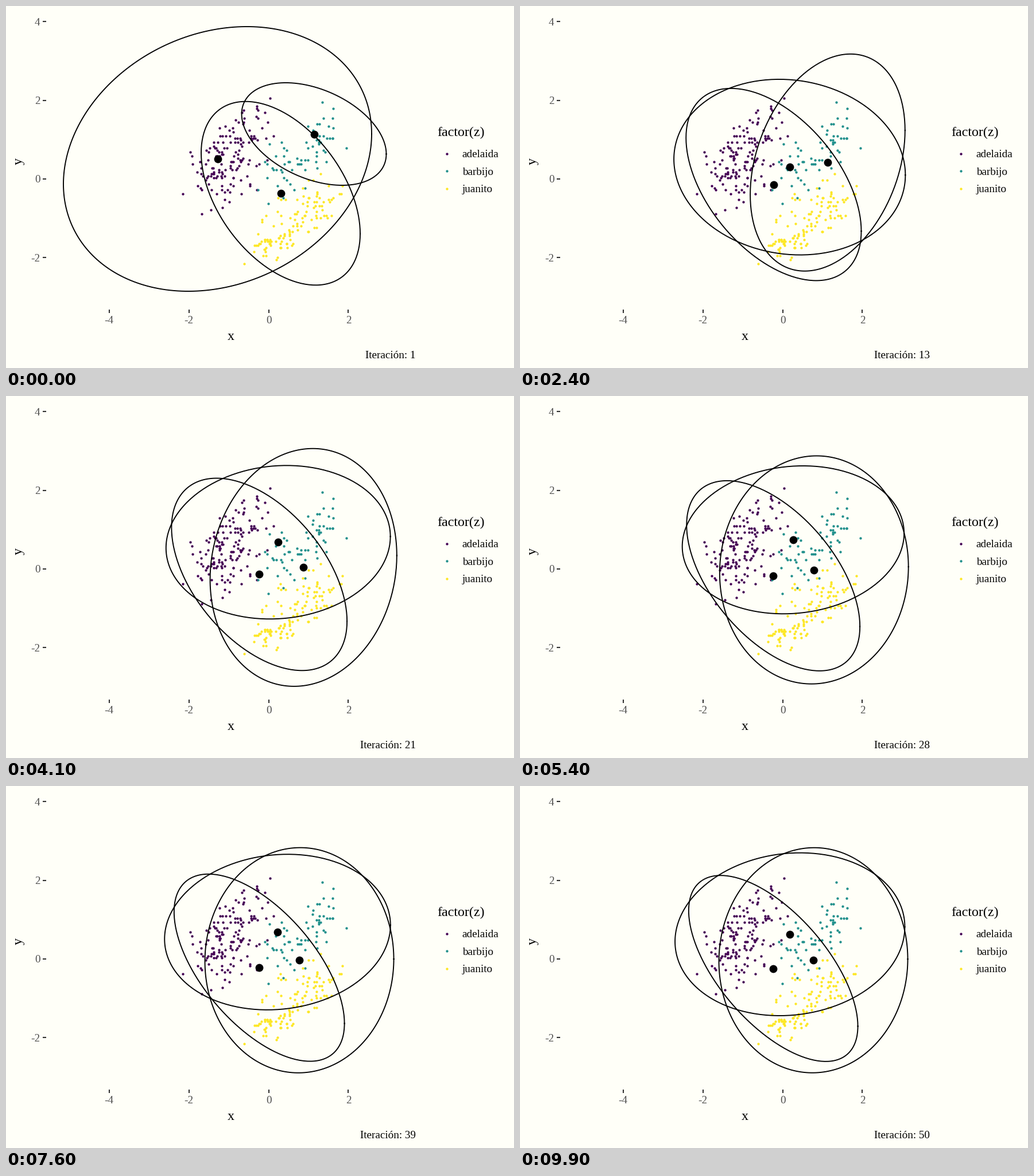
Write a matplotlib script that moves like this. It is 885x632 px and loops after 10 s.

```python
import numpy as np
import matplotlib.pyplot as plt
from matplotlib.animation import FuncAnimation

W, H, DPI = 885, 632, 100
FRAMES, INTERVAL, STEPS = 100, 100, 50
PT = 72 / DPI
INK, GREY = "black", "#4D4D4D"
X0, Y0, SX, SY = 457.5, 302, 69.45, 68.65

plt.rcParams["font.family"] = "Liberation Serif"
fig = plt.figure(figsize=(W / DPI, H / DPI), dpi=DPI, facecolor="#FFFFF8")
ax = fig.add_axes([0, 0, 1, 1])
ax.set(xlim=(0, W), ylim=(H, 0))
ax.axis("off")
rng = np.random.default_rng(7)


def text(x, y, s, px=19.2, color=INK, **kw):
    kw.setdefault("va", "baseline")
    return ax.text(x, y, s, fontsize=px * PT, color=color, **kw)


def dots(x, y, radius, color, z):
    return ax.plot(x, y, "o", ms=2 * radius * PT, mew=0, color=color, zorder=z)[0]


def sample(n, length, depth, r):
    """Correlated measures in mm as (mean, sd), to 0.1 mm, then standardised."""
    u, v = np.clip(rng.standard_normal((2, n)), -2.5, 2.5)
    a = np.round(length[0] + length[1] * u, 1)
    b = np.round(depth[0] + depth[1] * (r * u + np.sqrt(1 - r * r) * v), 1)
    return X0 + SX * (a - 43.92) / 5.46, Y0 - SY * (b - 17.15) / 1.975


# Each group mixes two clouds, the smaller and the larger animals.
groups = [
    ("adelaida", "#440154", [(75, (37.3, 2.05), (17.6, .95), .15),
                             (76, (40.4, 2.25), (19.05, 1.0), .1)]),
    ("barbijo", "#21908C", [(34, (46.6, 2.6), (17.6, .8), .25),
                            (34, (51.1, 1.55), (19.25, .75), .45)]),
    ("juanito", "#FDE725", [(60, (45.6, 2.0), (14.25, .55), .4),
                            (63, (49.5, 2.6), (15.7, .72), .3)]),
]

text(751, 227.5, "factor(z)", 24)
for i, (name, color, clouds) in enumerate(groups):
    for cloud in clouds:
        dots(*sample(*cloud), 2.15, color, 2)
    row = 258 + 30.4 * i
    dots([767.5], [row], 2.15, color, 2)
    text(794.7, row + 6.3, name)

tick = dict(color="#333333", lw=2.1 * PT, solid_capstyle="butt")
for v in range(-2, 5, 2):
    y = Y0 - SY * v
    ax.plot([64, 70.3], [y, y], **tick)
    text(59.5, y + 6.3, str(v), color=GREY, ha="right")
for v in range(-4, 3, 2):
    x = X0 + SX * v
    ax.plot([x, x], [529.7, 536], **tick)
    text(x, 553.8, str(v), color=GREY, ha="center")
text(391.5, 583, "x", 24, ha="center")
text(22.4, 271, "y", 24, ha="center", va="center", rotation=90)
caption = text(713.7, 614.8, "", ha="right")


def settle(k, start, rest, tau, power, *humps):
    """Decay from start to rest, plus passing humps of (peak, sharpness, size)."""
    start, rest = np.array(start), np.array(rest)
    pose = rest + (start - rest) * np.exp(-(k / tau) ** power)
    for peak, sharp, size in humps:
        x = k / peak
        pose = pose + np.array(size) * (x * np.exp(1 - x)) ** sharp
    return pose


# Poses are centre x, centre y, half width, half height, correlation.
ellipses = [
    dict(start=(368.5, 267, 268.5, 231, .19), rest=(469.4, 260, 201.2, 144.1, .09),
         tau=6, power=1,
         humps=[(18, 6, (2, 29, 0, 12, -.24)), (54, 9, (6.5, -9, -8, -15, 0))]),
    dict(start=(478.5, 327, 138.5, 160.3, -.44), rest=(441.2, 319, 147, 162, -.63),
         tau=6, power=1,
         humps=[(32, 3, (0, -8.4, 6.5, 6.5, .158))]),
    dict(start=(536.5, 223.5, 126, 89.5, -.39), rest=(511, 304.2, 164.5, 196.5, .01),
         tau=24.5, power=2,
         humps=[(12, 3, (9.5, 0, -47, -10, .58)), (27, 8, (12, 0, 4, 40, .22))]),
]
rings = [ax.plot([], [], color=INK, lw=1.9 * PT, zorder=3)[0] for _ in ellipses]
centres = dots([], [], 6.9, INK, 4)
angle = np.linspace(0, 2 * np.pi, 241)


def update(k):
    poses = [settle(k, e["start"], e["rest"], e["tau"], e["power"], *e["humps"])
             for e in ellipses]
    for ring, (cx, cy, w, h, r) in zip(rings, poses):
        lift = r * np.cos(angle) + np.sqrt(1 - r * r) * np.sin(angle)
        ring.set_data(cx + w * np.cos(angle), cy - h * lift)
    centres.set_data([p[0] for p in poses], [p[1] for p in poses])
    step = round(1 + (STEPS - 1) * k / (FRAMES - 1))
    caption.set_text(f"Iteración: {step}")
    return [*rings, centres, caption]


anim = FuncAnimation(fig, update, frames=FRAMES, interval=INTERVAL,
                     repeat=True, repeat_delay=0, blit=False)
plt.show()
```
